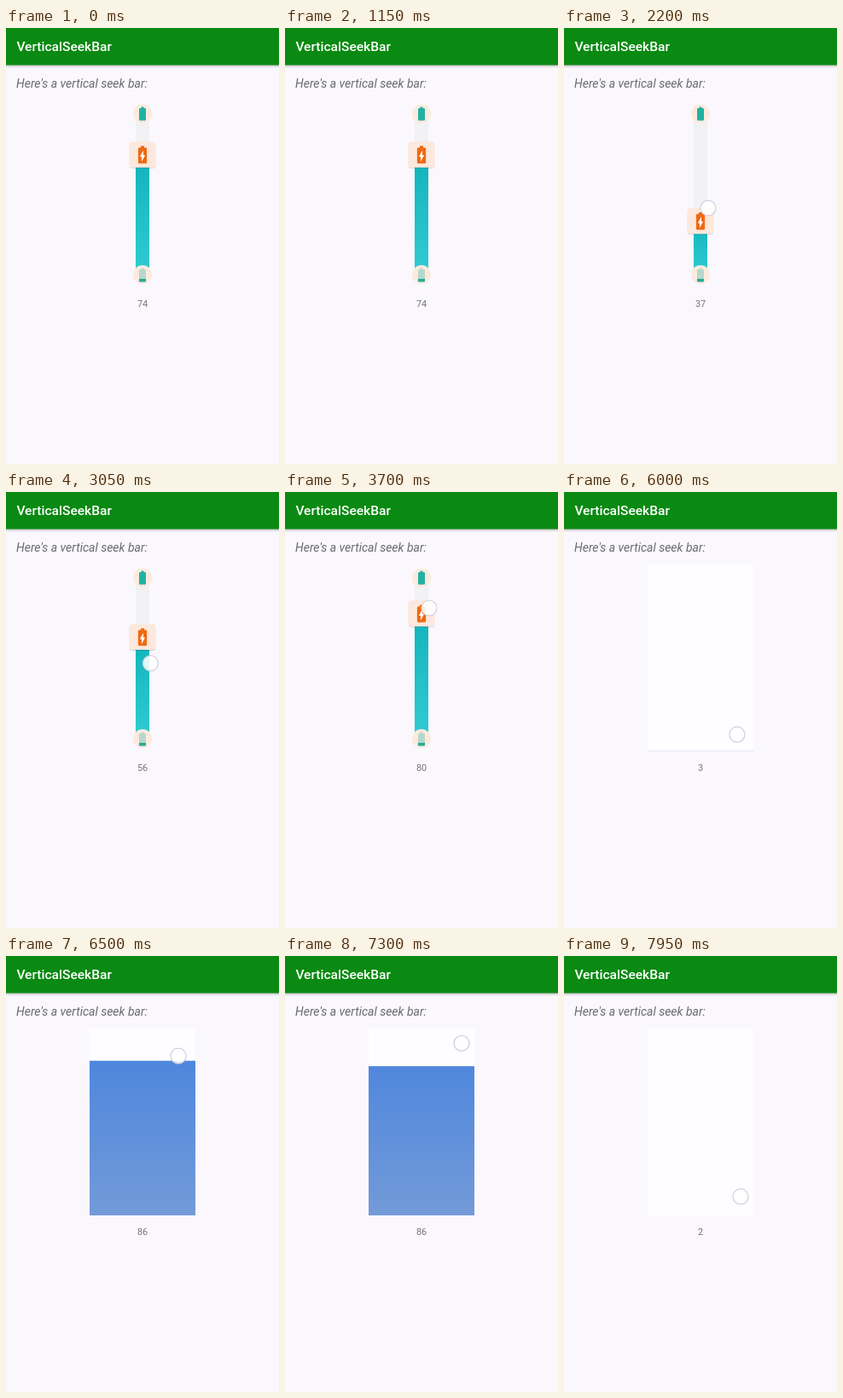
Recreate the animation shown at these times as an HTML page. Size 320 px wide and 511 px high, loop 8 s.

```html
<!DOCTYPE html>
<html lang="en">
<head>
<meta charset="utf-8">
<title>VerticalSeekBar</title>
<style>
  html, body { margin: 0; width: 100%; height: 100%; overflow: hidden; background: #faf8fc; }
  svg { display: block; width: 320px; height: 511px; font-family: Roboto, "Noto Sans", sans-serif; }
</style>
</head>
<body>
<svg viewBox="0 0 320 511">
  <defs>
    <linearGradient id="drop" x2="0" y2="1">
      <stop stop-color="#000" stop-opacity=".24"/>
      <stop offset="1" stop-color="#000" stop-opacity="0"/>
    </linearGradient>
    <linearGradient id="teal" x2="0" y2="1">
      <stop stop-color="#12b3bb"/>
      <stop offset="1" stop-color="#30cbd2"/>
    </linearGradient>
    <linearGradient id="sky" gradientUnits="userSpaceOnUse" x1="0" y1="115" x2="0" y2="304">
      <stop stop-color="#4d86dd"/>
      <stop offset="1" stop-color="#739ad8"/>
    </linearGradient>
    <filter id="soft" x="-20%" y="-20%" width="140%" height="150%">
      <feDropShadow dx="0" dy=".7" stdDeviation=".6" flood-opacity=".25"/>
    </filter>
    <path id="cell" d="M15.7 4H14V2h-4v2H8.3Q7 4 7 5.3v15.4Q7 22 8.3 22h7.4q1.3 0 1.3-1.3V5.3Q17 4 15.7 4z"/>
  </defs>

  <rect width="320" height="511" fill="#faf8fc"/>
  <rect y="43" width="320" height="4" fill="url(#drop)"/>
  <rect width="320" height="43.5" fill="#0a8a12"/>
  <text x="12.4" y="27" font-size="15.55" font-weight="500" fill="#fff">VerticalSeekBar</text>
  <text x="12" y="70" font-size="14" font-style="italic" fill="#6b6a6e">Here's a vertical seek bar:</text>

  <g id="slim">
    <rect x="152" y="100" width="16" height="188" fill="#f2f1f4"/>
    <rect id="slimFill" x="152" width="16" fill="url(#teal)"/>
    <g fill="#fdeadf">
      <circle cx="160" cy="100.5" r="11"/>
      <circle cx="160" cy="289" r="11"/>
    </g>
    <use href="#cell" transform="translate(150.4 90.9) scale(.8)" fill="#22b1a2"/>
    <g transform="translate(150.4 279.9) scale(.8)">
      <use href="#cell" fill="#b5d8cb"/>
      <path d="M7 17.5h10v3.2Q17 22 15.7 22H8.3Q7 22 7 20.7z" fill="#25ab94"/>
    </g>
    <g id="thumb">
      <rect x="-15.3" y="-15.3" width="30.6" height="30" rx="3.5" fill="#fde8dd" filter="url(#soft)"/>
      <g transform="translate(-12.3 -12.6) scale(1.025)">
        <use href="#cell" fill="#ee6a12"/>
        <path d="M11 20v-5.5H9L13 7v5.5h2z" fill="#fff"/>
      </g>
    </g>
  </g>

  <g id="wide">
    <rect x="98" y="85" width="124" height="219" fill="#fefdff"/>
    <rect id="wideFill" x="98" width="124" fill="url(#sky)"/>
  </g>

  <text id="label" x="160" y="327" font-size="10.9" text-anchor="middle" fill="#747376"></text>
  <circle id="touch" r="9" fill="#fff" fill-opacity=".88" stroke="#cfcfde" stroke-width="1.2"/>
</svg>
<script>
const LOOP = 8000, TOP = 85, BOTTOM = 304;
const PRESS = 1600, LIFT = 5500, SWITCH = 5900;
const $ = id => document.getElementById(id);

// Turning points of the finger: time, x, y
const turns = [
  [PRESS, 169, 141], [1880, 169, 255], [2550, 169, 161], [2900, 169, 161],
  [3250, 170, 262], [3650, 168, 129], [4000, 185, 265], [4300, 217, 118],
  [5000, 207, 370], [LIFT, 207, 370], [5870, 203, 305], [6480, 202, 115],
  [6750, 205, 262], [7020, 207, 156], [7480, 207, 76], [7640, 207, 356],
  [8240, 207, 216]
];

// Each swing eases from one turning point to the next
function finger(t) {
  const i = Math.max(1, turns.findIndex(p => p[0] > t));
  const [t0, x0, y0] = turns[i - 1], [t1, x1, y1] = turns[i];
  const u = Math.max(0, (t - t0) / (t1 - t0));
  const s = (1 - Math.cos(Math.PI * u)) / 2;
  return { x: x0 + (x1 - x0) * s, y: y0 + (y1 - y0) * s };
}

const progress = t =>
  Math.max(0, Math.min(1, (BOTTOM - finger(t).y) / (BOTTOM - TOP)));

const show = (id, on) => $(id).style.display = on ? "" : "none";

function fillFrom(id, y, bottom) {
  $(id).setAttribute("y", y);
  $(id).setAttribute("height", Math.max(0, bottom - y));
}

function draw(t) {
  const bar = progress(t - 100);   // the bar trails the label, which trails the finger
  const thumbY = 288 - 187 * bar;
  show("slim", t < SWITCH);
  show("wide", t >= SWITCH);
  fillFrom("slimFill", thumbY, 288);
  fillFrom("wideFill", BOTTOM - (BOTTOM - TOP) * bar, BOTTOM);
  $("thumb").setAttribute("transform", `translate(160 ${thumbY})`);
  $("label").textContent = Math.round(100 * progress(t - 50));

  const { x, y } = finger(t);
  show("touch", t >= PRESS && t < LIFT || t >= SWITCH);
  $("touch").setAttribute("transform", `translate(${x} ${y})`);
}

const start = performance.now();
function tick() {
  draw((performance.now() - start) % LOOP);
  requestAnimationFrame(tick);
}
tick();
</script>
</body>
</html>
```
